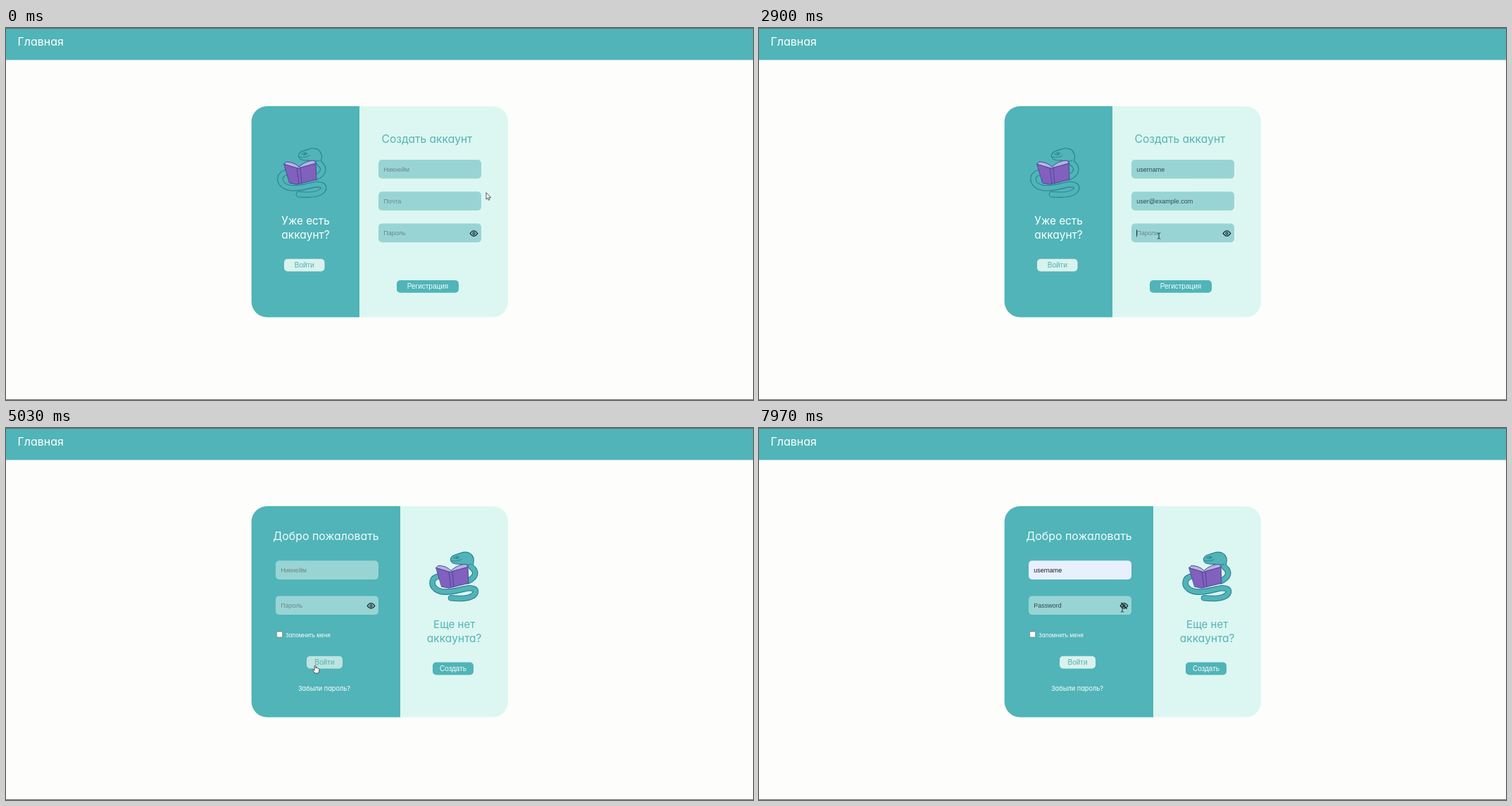
Recreate the animation shown at these times as an HTML page. Size 1061 px wide and 528 px high, loop 8 s.

```html
<!DOCTYPE html>
<html lang="ru">
<head>
<meta charset="utf-8">
<style>
  html, body { margin: 0; width: 100%; height: 100%; overflow: hidden; background: #fdfdfc; }
  svg { display: block; width: 100vw; height: 100vh; }
  text { font: 9px "Liberation Sans", Arial, sans-serif; white-space: pre; }
  .head { font-family: Inter, "Open Sans", sans-serif; font-feature-settings: "cv11"; }
  .mid { text-anchor: middle; }
</style>
</head>
<body>
<svg id="stage" viewBox="0 0 1061 528" preserveAspectRatio="none"></svg>
<script>
const LOOP = 8000;
const TEAL = '#50b4b8', MINT = '#dcf7f1', INK = '#2b7f92', FIELD = '#99d4d4';
const stage = document.getElementById('stage');

const rect = (x, y, w, h, r, fill, extra = '') =>
  `<rect x="${x}" y="${y}" width="${w}" height="${h}" rx="${r}" fill="${fill}" ${extra}/>`;
const heading = (x, y, size, fill, text, cls = 'mid') =>
  `<text class="head ${cls}" x="${x}" y="${y}" style="font-size:${size}px" fill="${fill}">${text}</text>`;

// Input boxes and buttons, grouped by page
const fields = {
  nick:  { page: 'signup', x: 529, y: 187, hint: 'Никнейм' },
  mail:  { page: 'signup', x: 529, y: 232.3, hint: 'Почта' },
  pass:  { page: 'signup', x: 529, y: 277.6, hint: 'Пароль', eye: true },
  login: { page: 'signin', x: 383, y: 188.2, hint: 'Никнейм' },
  key:   { page: 'signin', x: 383, y: 238.4, hint: 'Пароль', eye: true }
};
const buttons = {
  toSignin: { page: 'signup', x: 395, y: 327.7, w: 57.5, text: 'Войти', fill: '#d9f2ec', hover: '#bde4df', ink: '#50b0b3' },
  register: { page: 'signup', x: 555, y: 358, w: 88, text: 'Регистрация', fill: TEAL, hover: '#469fa3', ink: '#f4fdfb' },
  enter:    { page: 'signin', x: 427, y: 323.7, w: 51, text: 'Войти', fill: '#d9f2ec', hover: '#bde4df', ink: '#50b0b3' },
  toSignup: { page: 'signin', x: 606, y: 332.6, w: 58, text: 'Создать', fill: TEAL, hover: '#469fa3', ink: '#f4fdfb' }
};
for (const f of Object.values(fields)) Object.assign(f, { w: 146, h: 26.7 });
for (const b of Object.values(buttons)) b.h = 17.8;

const eyeIcon = (id, x, y) => `<g transform="translate(${x} ${y})" fill="none" stroke="#172f34" stroke-width="1.25">
  <path d="M-5.3 0Q0-7.4 5.3 0Q0 7.4-5.3 0Z"/><circle r="1.6"/>
  <path id="${id}-slash" d="M-4.2-4.4L4.2 4.4" visibility="hidden"/></g>`;

const fieldMarkup = ([id, f]) =>
  rect(f.x, f.y, f.w, f.h, 5, FIELD, `id="${id}-box"`) +
  `<text id="${id}-text" x="${f.x + 7.2}" y="${f.y + 16.5}"></text>` +
  `<path id="${id}-caret" stroke="#182c30" stroke-width=".9"/>` +
  (f.eye ? eyeIcon(id, f.x + 135.5, f.y + 14) : '');

const buttonMarkup = ([id, b]) =>
  rect(b.x, b.y, b.w, b.h, 5, b.fill, `id="${id}-box"`) +
  `<text class="mid" x="${b.x + b.w / 2}" y="${b.y + 12.4}" style="font-size:10px" fill="${b.ink}">${b.text}</text>`;

const controls = page => {
  const on = ([, c]) => c.page === page;
  return Object.entries(fields).filter(on).map(fieldMarkup).join('') +
    Object.entries(buttons).filter(on).map(buttonMarkup).join('');
};

const BODY = 'M56 8C61 13 54 17 58 22C67 29 64 37 53 42M12 35C1 37 0 47 7 53C17 61 36 56 48 53C60 50 67 54 63 60C57 68 39 67 29 66';
const reader = (x, y) => `<g transform="translate(${x} ${y})" stroke-linejoin="round" stroke-linecap="round">
  <g fill="none"><path d="${BODY}" stroke="${INK}" stroke-width="8.6"/>
  <path d="${BODY}" stroke="${TEAL}" stroke-width="6.4"/></g>
  <path d="M58 18C52 21 46 17 39 18C31 18 27 14 29 9C31 4 38 4 43 2C51-1 59 2 60 8" fill="${TEAL}" stroke="${INK}" stroke-width="1.1"/>
  <path d="M33 9Q37 5 41 8Q38 12 33 9M30 13Q38 15 44 11" fill="none" stroke="${INK}" stroke-width=".9"/>
  <circle cx="37.5" cy="8.7" r="1.2" fill="${INK}"/>
  <g stroke="#46499a" stroke-width="1">
    <path d="M8 23L28 29L53 22L54 45L26 52L16 50Z" fill="#8260bd"/>
    <path d="M8 23L11 20Q22 20 29 27Q39 18 51 18L53 22L28 29Z" fill="#b9b3df"/>
    <path d="M26 29L29 51M31 28L33 50" fill="none"/>
  </g></g>`;

stage.innerHTML = `
  <defs><clipPath id="card">${rect(348.7, 111, 364.5, 299.4, 22, '#000')}</clipPath></defs>
  ${rect(0, 0, 1061, 528, 0, '#fdfdfc')}
  ${rect(0, 0, 1061, 45.4, 0, TEAL)}
  ${rect(0, 0, 1061, 1, 0, '#59686b')}
  ${rect(0, 527, 1061, 1, 0, '#686868')}
  ${heading(16.5, 25, 16, '#fff', 'Главная', '')}
  <g clip-path="url(#card)">
    ${rect(348, 111, 366, 300, 0, MINT)}
    ${rect(348, 111, 154, 300, 0, TEAL, 'id="panel"')}
  </g>
  <g id="signup">
    ${reader(387, 170)}
    ${heading(425.5, 279, 15.3, '#fff', 'Уже есть')}
    ${heading(425.5, 299.3, 15.5, '#fff', 'аккаунт?')}
    ${heading(598, 163, 15.6, '#55b3b5', 'Создать аккаунт')}
    ${controls('signup')}
  </g>
  <g id="signin">
    ${reader(603, 175.3)}
    ${heading(454.5, 159, 15.9, '#eefcf9', 'Добро пожаловать')}
    ${heading(636.7, 284, 15.1, '#55b3b5', 'Еще нет')}
    ${heading(636.7, 304.3, 15.5, '#55b3b5', 'аккаунта?')}
    ${rect(384.6, 289, 8, 8, 1.3, '#fff', 'stroke="#777" stroke-width=".7"')}
    ${heading(397, 296.8, 7.8, '#fff', 'Запомнить меня', '')}
    ${heading(452, 373, 9.2, '#fff', 'Забыли пароль?')}
    ${controls('signin')}
  </g>
  <g id="pointer" stroke-linejoin="round" stroke-linecap="round">
    <path id="arrow" d="M0 0V9.2L2.1 7.3L3.6 10.4L5 9.7L3.6 6.7H6.4Z" fill="#fff" stroke="#333" stroke-width=".8"/>
    <path id="beam" d="M-1.8-4.2Q0-4.2 0-3.2Q0-4.2 1.8-4.2M0-3.2V3.2M-1.8 4.2Q0 4.2 0 3.2Q0 4.2 1.8 4.2" fill="none" stroke="#24383b" stroke-width="1"/>
    <path id="hand" d="M-.9 6V.7Q0-.8 1 .7V3.8Q2-.1 2.7 4Q3.8 3 4.3 4.5Q5.8 4 5.8 5.7V8.2L4.6 11H-.2L-3.4 6.9Q-3.2 5-0.9 7Z" fill="#fff" stroke="#333" stroke-width=".8"/>
  </g>`;

const $ = id => document.getElementById(id);
const show = (id, on) => $(id).setAttribute('visibility', on ? 'inherit' : 'hidden');

// Pointer stops: time, x, y
const path = [
  [0, 682, 234], [60, 682, 234], [340, 592, 203], [900, 592, 203], [1140, 575, 247],
  [2300, 575, 247], [2640, 568, 295], [3600, 568, 295], [4080, 603, 367], [4760, 603, 367],
  [4940, 439, 337], [5060, 439, 337], [5340, 446, 203], [5720, 446, 203], [5960, 450.5, 251],
  [6950, 450.5, 251], [7380, 516, 257], [8000, 516, 257]
];
function pointerAt(t) {
  const i = Math.max(1, path.findIndex(p => t < p[0]));
  const [t0, x0, y0] = path[i - 1], [t1, x1, y1] = path[i];
  const u = (t - t0) / (t1 - t0), k = u * u * (3 - 2 * u);
  return [x0 + (x1 - x0) * k, y0 + (y1 - y0) * k];
}

const SUBMIT = 4430, SWITCH = 4990, REVEAL = 7520;
// Focus span, then typing span
const typing = {
  nick:  { focus: [400, 1190], keys: [460, 860], text: 'username' },
  mail:  { focus: [1190, 2700], keys: [1280, 2240], text: 'user@example.com' },
  pass:  { focus: [2700, SUBMIT], keys: [2960, 3520], text: 'Password' },
  login: { focus: [5390, 5990], keys: [5600, 5600], text: 'username' },
  key:   { focus: [5990, REVEAL], keys: [6220, 6820], text: 'Password' }
};

function drawField(id, t) {
  const f = fields[id], { focus, keys: [from, to], text } = typing[id];
  const cleared = f.page === 'signup' && t >= SUBMIT;
  const part = to > from ? (t - from) / (to - from) : +(t >= from);
  const count = cleared ? 0 : Math.floor(text.length * Math.min(1, Math.max(0, part)));
  const filled = id === 'login' && count > 0;
  const hidden = f.eye && !(id === 'key' && t >= REVEAL);
  const label = $(id + '-text');
  label.textContent = count ? (hidden ? '•'.repeat(count) : text.slice(0, count)) : f.hint;
  label.setAttribute('fill', count ? (filled ? '#171a20' : '#2d4b4e') : '#6c8888');
  $(id + '-box').setAttribute('fill', filled ? '#e8f0fe' : FIELD);

  const active = t >= focus[0] && t < focus[1];
  const since = t < from ? t - focus[0] : Math.max(0, t - to);
  show(id + '-caret', active && since % 1000 < 500);
  if (active) {
    const x = f.x + 7.5 + (count ? label.getComputedTextLength() : 0);
    $(id + '-caret').setAttribute('d', `M${x} ${f.y + 8.6}v10`);
  }
}

function draw(t) {
  const page = t < SWITCH ? 'signup' : 'signin';
  show('signup', page === 'signup');
  show('signin', page === 'signin');
  $('panel').setAttribute('width', page === 'signup' ? 154 : 212);
  Object.keys(fields).forEach(id => drawField(id, t));
  show('key-slash', t >= REVEAL);

  const [x, y] = pointerAt(t);
  const over = c => c.page === page && x >= c.x && x <= c.x + c.w && y >= c.y && y <= c.y + c.h;
  let kind = Object.values(fields).some(over) ? 'beam' : 'arrow';
  for (const [id, b] of Object.entries(buttons)) {
    const hot = over(b);
    if (hot) kind = 'hand';
    $(id + '-box').setAttribute('fill', hot ? b.hover : b.fill);
  }
  ['arrow', 'beam', 'hand'].forEach(k => show(k, k === kind));
  $('pointer').setAttribute('transform', `translate(${x} ${y})`);
}

const start = performance.now();
function tick() {
  draw((performance.now() - start) % LOOP);
  requestAnimationFrame(tick);
}
tick();
</script>
</body>
</html>
```
